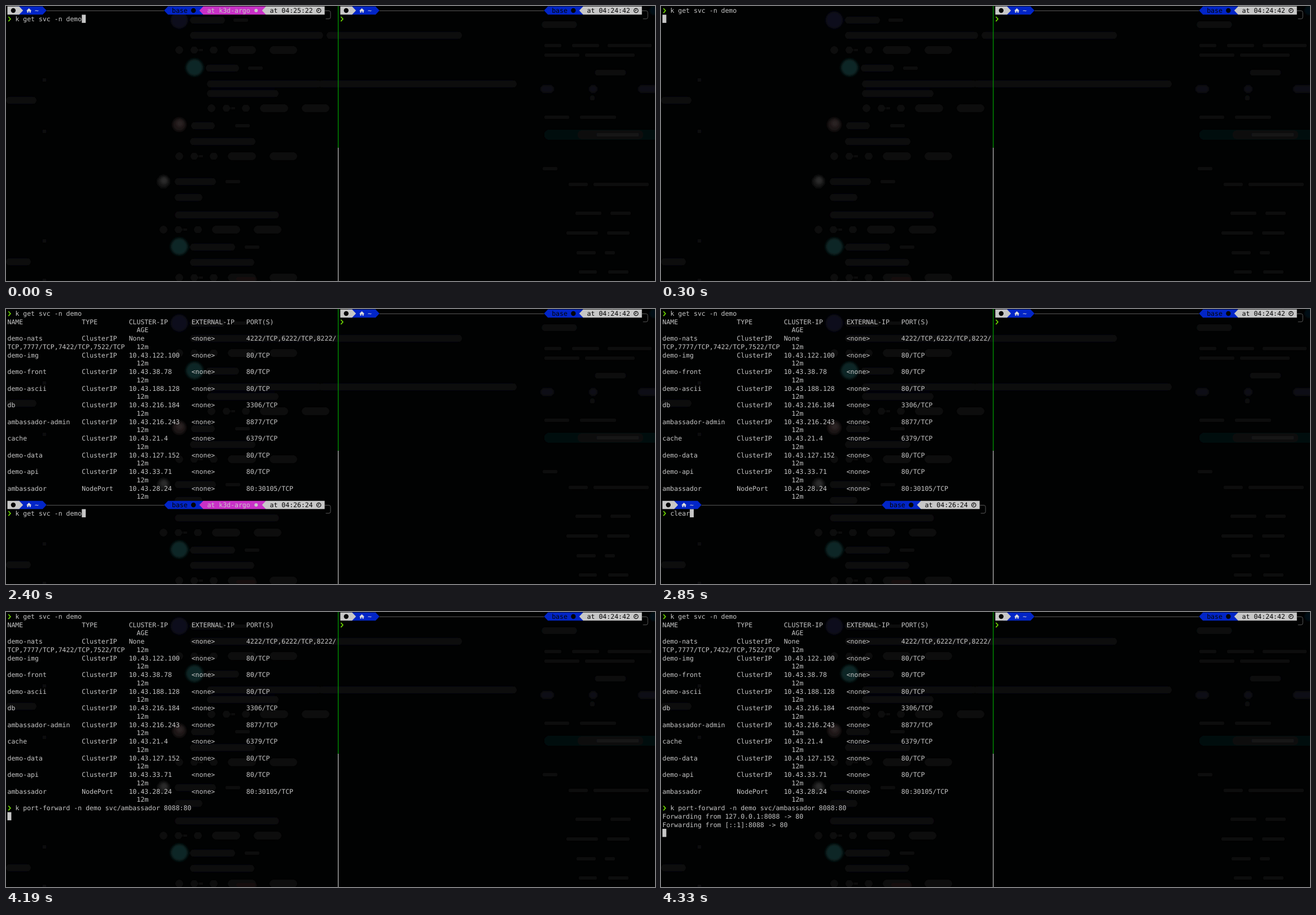
Animation, 1150 px wide and 487 px high, one loop 8000 ms. Source, as an HTML page:

```html
<!DOCTYPE html>
<html lang="en">
<head>
<meta charset="utf-8">
<title>Terminal session</title>
<style>
  html, body { margin: 0; width: 100%; height: 100%; overflow: hidden; background: #010202; }
  svg { display: block; width: 1150px; height: 487px; }
  text {
    font: 11.53px "DejaVu Sans Mono", monospace;
    white-space: pre;
    text-rendering: geometricPrecision;
  }
</style>
</head>
<body>
<svg id="stage" viewBox="0 0 1150 487" xmlns="http://www.w3.org/2000/svg">
  <defs>
    <filter id="soft" x="-5%" y="-5%" width="110%" height="110%"><feGaussianBlur stdDeviation="2.2"/></filter>
  </defs>
</svg>
<script>
const LOOP = 8000;
const CELL = 6.94, LINE = 14.74, LEFT = 2.5, TOP = 0.7;
const INK = "#c7c7c7", BLACK = "#050505", BLUE = "#0225c7", PINK = "#c930c7";
const GREEN = "#6fd800", RULE = "#585858";
const stage = document.getElementById("stage");

const colX = c => LEFT + c * CELL;
const rowY = r => TOP + r * LINE;
const midY = r => rowY(r) + 7.3;

function add(parent, tag, attrs, content) {
  const node = document.createElementNS("http://www.w3.org/2000/svg", tag);
  for (const key in attrs) node.setAttribute(key, attrs[key]);
  if (content !== undefined) node.textContent = content;
  parent.append(node);
  return node;
}
const group = (attrs = {}) => add(stage, "g", attrs);
const path = (g, d, fill) => add(g, "path", { d, fill });
const stroke = (g, d, color, width = 1) =>
  add(g, "path", { d, fill: "none", stroke: color, "stroke-width": width });
const dot = (g, cx, cy, r, fill) => add(g, "circle", { cx, cy, r, fill });
const write = (g, col, row, str, fill = INK) =>
  add(g, "text", { x: colX(col), y: rowY(row) + 11.3, fill }, str);
const cursor = (g, col, row) =>
  add(g, "rect", { x: colX(col), y: rowY(row), width: CELL, height: LINE - 0.3, fill: INK });

// Blurred page behind the translucent window
function backdrop() {
  const g = group({ filter: "url(#soft)" });
  const bar = (x, y, w, h, fill) =>
    add(g, "rect", { x, y: y - h / 2, width: w, height: h, rx: h / 2, fill });

  const lines = [
    [326, 52, 236], [568, 52, 240], [356, 138, 202], [555, 138, 350], [356, 155, 127],
    [326, 240, 116], [299, 311, 73], [299, 339, 49], [326, 427, 80], [326, 454, 114],
    [328, 212, 42], [326, 25, 62], [354, 110, 59], [0, 167, 54], [0, 453, 44]
  ];
  for (const [x, y, w] of lines) bar(x, y, w, 13, "#0b0c0e");
  bar(299, 370, 185, 13, "#0c080e");

  const actions = [[299, 78], [356, 181], [299, 266], [271, 396], [299, 481]];
  for (const [x, y] of actions) {
    dot(g, x + 8, y, 7, "#0b0b0c");
    bar(x + 28, y, 13, 13, "#0b0b0c");
    bar(x + 43, y, 8, 5, "#09090a");
    bar(x + 62, y, 14, 13, "#0b0b0c");
    bar(x + 94, y, 50, 14, "#0b0c0d");
    bar(x + 168, y, 49, 14, "#0b0b0c");
  }

  const stamps = [[402, 25], [428, 110], [405, 212], [388, 311], [422, 427]];
  for (const [x, y] of stamps) bar(x, y, 28, 6, "#08090a");

  const side = [
    [953, 70, 32], [1002, 70, 50], [1065, 70, 80], [953, 87, 64], [1025, 87, 90],
    [953, 197, 46], [1016, 197, 66], [950, 288, 28], [996, 316, 36], [1040, 316, 100],
    [1008, 367, 48], [1070, 367, 38], [992, 402, 58], [1064, 402, 42],
    [1010, 437, 36], [1060, 437, 20], [1014, 471, 34], [1066, 471, 38]
  ];
  for (const [x, y, w] of side) bar(x, y, w, 6, "#08090a");
  bar(949, 33, 63, 13, "#090a0b");
  bar(1043, 118, 56, 11, "#08090a");
  bar(953, 228, 210, 19, "#060708");
  bar(1013, 228, 116, 15, "#0c0d0e");
  bar(1046, 228, 76, 7, "#121314");
  bar(947, 147, 24, 14, "#101113");
  bar(1033, 147, 15, 14, "#101113");
  bar(1120, 147, 36, 14, "#101113");
  dot(g, 1039, 163, 5, "#08090a");
  dot(g, 1148, 8, 8, "#050d17");

  for (const y of [131, 222, 416, 486]) dot(g, 68, y, 4, "#080809");
  dot(g, 307, 25, 15, "#10111c");
  dot(g, 334, 109, 15, "#0b2825");
  dot(g, 307, 426, 15, "#0b2825");
  dot(g, 307, 210, 12, "#1c1516");
  dot(g, 308, 208, 6, "#2b2223");
  dot(g, 279, 311, 11, "#181918");
  dot(g, 280, 309, 6, "#292a29");
  bar(408, 484, 36, 9, "#170c0d");
}

function chevron(g, row, x = 0) {
  const y = midY(row);
  stroke(g, `M${x + 4.3} ${y - 3.8}L${x + 7.9} ${y + 0.3}L${x + 4.3} ${y + 4.4}`, GREEN, 1.7);
}

// Block whose left edge is an arrow tip pointing left
function tab(g, from, to, row, fill) {
  const y = rowY(row), h = LINE - 0.3, tip = colX(from), x = colX(from + 1);
  path(g, `M${tip} ${y + h / 2}L${x} ${y}H${colX(to)}V${y + h}H${x}Z`, fill);
}

// Block whose right edge is an arrow tip pointing right
function flag(g, from, to, row, fill) {
  const y = rowY(row), h = LINE - 0.3, x = colX(to);
  path(g, `M${colX(from)} ${y}H${x}L${x + CELL} ${y + h / 2}L${x} ${y + h}H${colX(from)}Z`, fill);
}

// shift: first column of the pane; end: column where the right blocks stop
function header(g, row, time, cluster, shift = 0, end = 81) {
  const y = midY(row), clock = end - 16, base = clock - 9 - (cluster ? 16 : 0);

  stroke(g, `M${colX(shift + 10)} ${y + 0.5}H${colX(base)}`, RULE);
  const edge = colX(end + 1.5);
  stroke(g, `M${colX(end)} ${y + 0.5}H${edge - 3}Q${edge} ${y + 0.5} ${edge} ${y + 3.5}` +
    `V${y + LINE - 3}Q${edge} ${y + LINE} ${edge - 3} ${y + LINE}H${colX(end) + 2}`, RULE);

  flag(g, shift + 2, shift + 9, row, BLUE);
  flag(g, shift, shift + 3, row, INK);
  dot(g, colX(shift + 1.5), y, 4.2, BLACK);
  const hx = colX(shift + 5.5);
  path(g, `M${hx - 4.6} ${y + 0.4}L${hx} ${y - 3.9}L${hx + 4.6} ${y + 0.4}H${hx + 3.2}V${y + 3.8}` +
    `H${hx + 0.9}V${y + 1.2}H${hx - 0.9}V${y + 3.8}H${hx - 3.2}V${y + 0.4}Z`, "#dcdcdc");
  write(g, shift + 7, row, "~", "#dcdcdc");

  tab(g, base, base + 10, row, BLUE);
  write(g, base + 2, row, "base", BLACK);
  dot(g, colX(base + 7.5), y, 4.2, BLACK);
  if (cluster) {
    tab(g, clock - 16, clock + 1, row, PINK);
    write(g, clock - 14, row, "at k3d-argo", INK);
    dot(g, colX(clock - 1.5), y, 3, INK);
  }
  tab(g, clock, end, row, INK);
  write(g, clock + 2, row, "at " + time, BLACK);
  const cx = colX(clock + 14.5);
  add(g, "circle", { cx, cy: y, r: 3.7, fill: "none", stroke: BLACK, "stroke-width": 1.2 });
  stroke(g, `M${cx} ${y - 2.3}V${y + 0.5}H${cx - 2}`, BLACK);
}

function command(g, row, str, blink = true) {
  chevron(g, row);
  write(g, 2, row, str);
  if (blink) cursor(g, 2 + str.length, row);
}

const services = [
  ["demo-nats", "None", "4222/TCP,6222/TCP,8222/"],
  ["demo-img", "10.43.122.100", "80/TCP"],
  ["demo-front", "10.43.38.78", "80/TCP"],
  ["demo-ascii", "10.43.188.128", "80/TCP"],
  ["db", "10.43.216.184", "3306/TCP"],
  ["ambassador-admin", "10.43.216.243", "8877/TCP"],
  ["cache", "10.43.21.4", "6379/TCP"],
  ["demo-data", "10.43.127.152", "80/TCP"],
  ["demo-api", "10.43.33.71", "80/TCP"],
  ["ambassador", "10.43.28.24", "80:30105/TCP", "NodePort"]
];

function listing(g) {
  const line = (row, ...cells) =>
    cells.forEach((s, i) => write(g, [0, 19, 31, 47, 61][i], row, s));
  command(g, 0, LIST, false);
  line(1, "NAME", "TYPE", "CLUSTER-IP", "EXTERNAL-IP", "PORT(S)");
  write(g, 33, 2, "AGE");
  services.forEach(([name, ip, ports, type = "ClusterIP"], i) => {
    line(3 + 2 * i, name, type, ip, "<none>", ports);
    write(g, 33, 4 + 2 * i, "12m");
  });
  write(g, 0, 4, "TCP,7777/TCP,7422/TCP,7522/TCP");
}

const LIST = "k get svc -n demo";
const FORWARD = "k port-forward -n demo svc/ambassador 8088:80";

function prompt(g, str, cluster, blink) {
  header(g, 23, "04:26:24", cluster);
  command(g, 24, str, blink);
}

// [start ms, listing shown, draw]
const steps = [
  [0, false, g => { header(g, 0, "04:25:22", true); command(g, 1, LIST); }],
  [300, false, g => { command(g, 0, LIST, false); cursor(g, 0, 1); }],
  [450, true, g => prompt(g, "", false)],
  [2400, true, g => prompt(g, LIST, true)],
  [2850, true, g => prompt(g, "clear", false)],
  [3150, true, g => prompt(g, "clear", false, false)],
  [3290, true, g => prompt(g, FORWARD, true)],
  [4190, true, g => { command(g, 23, FORWARD, false); cursor(g, 0, 24); }],
  [4330, true, g => {
    command(g, 23, FORWARD, false);
    write(g, 0, 24, "Forwarding from 127.0.0.1:8088 -> 80");
    write(g, 0, 25, "Forwarding from [::1]:8088 -> 80");
    cursor(g, 0, 26);
  }]
];

backdrop();
const fixed = group();
header(fixed, 0, "04:24:42", false, 85, 162);
chevron(fixed, 1, 85 * CELL - 0.8);
add(fixed, "rect", { x: 588, y: 0, width: 1.3, height: 251, fill: "#009600" });
add(fixed, "rect", { x: 588, y: 251, width: 1.3, height: 236, fill: "#b4b4b4" });

const table = group();
listing(table);
const scenes = steps.map(([, , draw]) => {
  const g = group();
  draw(g);
  return g;
});

const show = (g, on) => { g.style.display = on ? "" : "none"; };
const start = performance.now();
function render() {
  const t = (performance.now() - start) % LOOP;
  const now = steps.findLastIndex(([at]) => at <= t);
  scenes.forEach((g, i) => show(g, i === now));
  show(table, steps[now][1]);
  requestAnimationFrame(render);
}
render();
</script>
</body>
</html>
```
